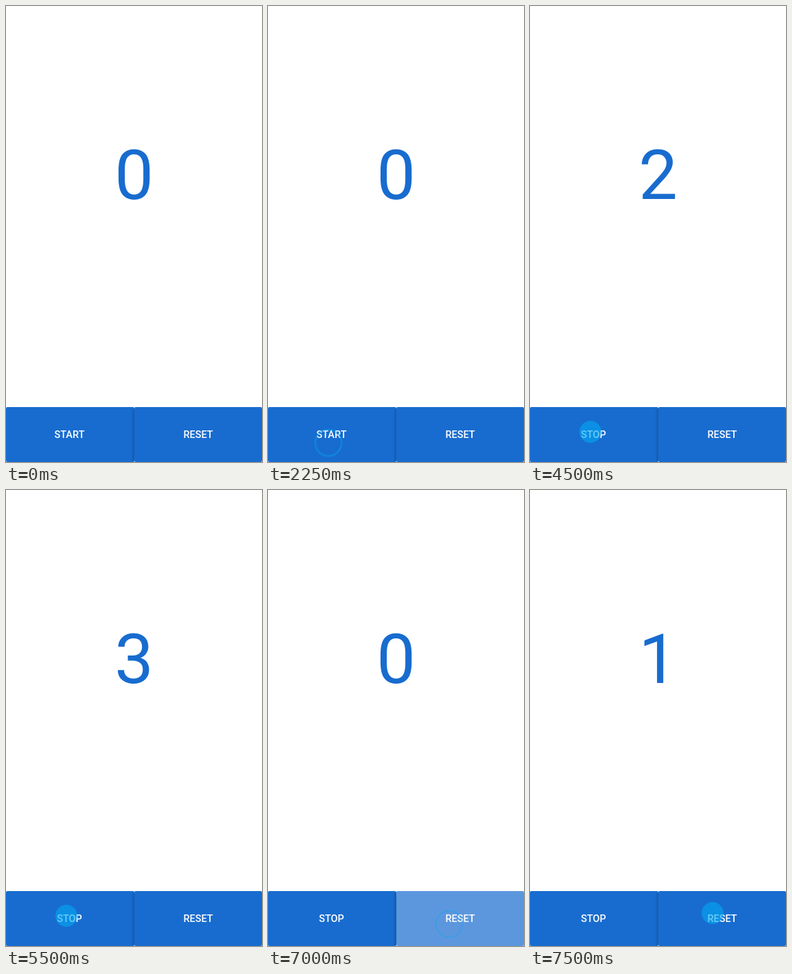
An HTML page with a canvas that plays this animation: 373x664 px, repeating every 8 s.

```html
<!DOCTYPE html>
<html lang="en">
<head>
<meta charset="utf-8">
<title>Counter</title>
<style>
  html, body { margin: 0; width: 373px; height: 664px; overflow: hidden; background: #fff; }
  canvas { display: block; }
</style>
</head>
<body>
<canvas id="stage" width="373" height="664"></canvas>
<script>
const ctx = document.getElementById('stage').getContext('2d');
const LOOP = 8000, STEP = 250;
const BLUE = '#186ccf', TOUCH = '#03a9f4';

// Each row holds from its start time until the next one.
const counts = [[0, 0], [3500, 1], [4500, 2], [5500, 3], [6500, 4], [7000, 0], [7500, 1]];
const touches = [
  [0], [500, 'dot', 111, 650], [750, 'dot', 91, 628],
  [1000, 'ring', 88, 637, 0.4], [1250],
  [1750, 'dot', 87, 622], [2250, 'ring', 88, 636, 0.4], [2500],
  [3000, 'dot', 88, 620], [5750, 'dot', 99, 618], [6000, 'dot', 171, 617],
  [6250, 'dot', 255, 615], [6500, 'dot', 266, 616],
  [6750, 'ring', 264, 632, 0.4], [7000, 'ring', 264, 632, 0.25], [7250],
  [7500, 'dot', 266, 616]
];

const at = (rows, t) => rows.filter(r => r[0] <= t).pop();

function label(text, x, y, font, color) {
  ctx.font = font + ' Roboto, sans-serif';
  ctx.textAlign = 'center';
  ctx.fillStyle = color;
  ctx.fillText(text, x, y);
}

function button(x, w, text, textX, alpha) {
  ctx.globalAlpha = alpha;
  ctx.fillStyle = BLUE;
  ctx.beginPath();
  ctx.roundRect(x, 584, w, 80, 2);
  ctx.fill();
  ctx.globalAlpha = 1;
  label(text, textX, 629, '500 14.5px', '#fff');
}

function seam() {
  const g = ctx.createLinearGradient(182, 0, 187, 0);
  g.addColorStop(0, 'rgba(0,0,0,0)');
  g.addColorStop(1, 'rgba(0,0,0,0.16)');
  ctx.fillStyle = g;
  ctx.fillRect(182, 587, 5, 77);
}

function touch([, kind, x, y, alpha]) {
  if (!kind) return;
  ctx.beginPath();
  if (kind === 'dot') {
    ctx.globalAlpha = 0.6;
    ctx.fillStyle = TOUCH;
    ctx.arc(x, y, 16, 0, Math.PI * 2);
    ctx.fill();
  } else {
    ctx.globalAlpha = alpha;
    ctx.strokeStyle = TOUCH;
    ctx.lineWidth = 2.5;
    ctx.arc(x, y, 19.2, 0, Math.PI * 2);
    ctx.stroke();
  }
  ctx.globalAlpha = 1;
}

function draw(t) {
  ctx.fillStyle = '#fff';
  ctx.fillRect(0, 0, 373, 664);
  label(at(counts, t)[1], 186.7, 281, '400 101px', BLUE);
  button(0, 187, t < 2500 ? 'START' : 'STOP', 92.5, 1);
  seam();
  const pressed = t >= 7000 && t < 7250;
  button(187, 186, 'RESET', 280, pressed ? 0.7 : 1);
  touch(at(touches, t));
}

function frame(now) {
  draw(Math.floor((now % LOOP) / STEP) * STEP);
  requestAnimationFrame(frame);
}
frame(0);
</script>
</body>
</html>
```
